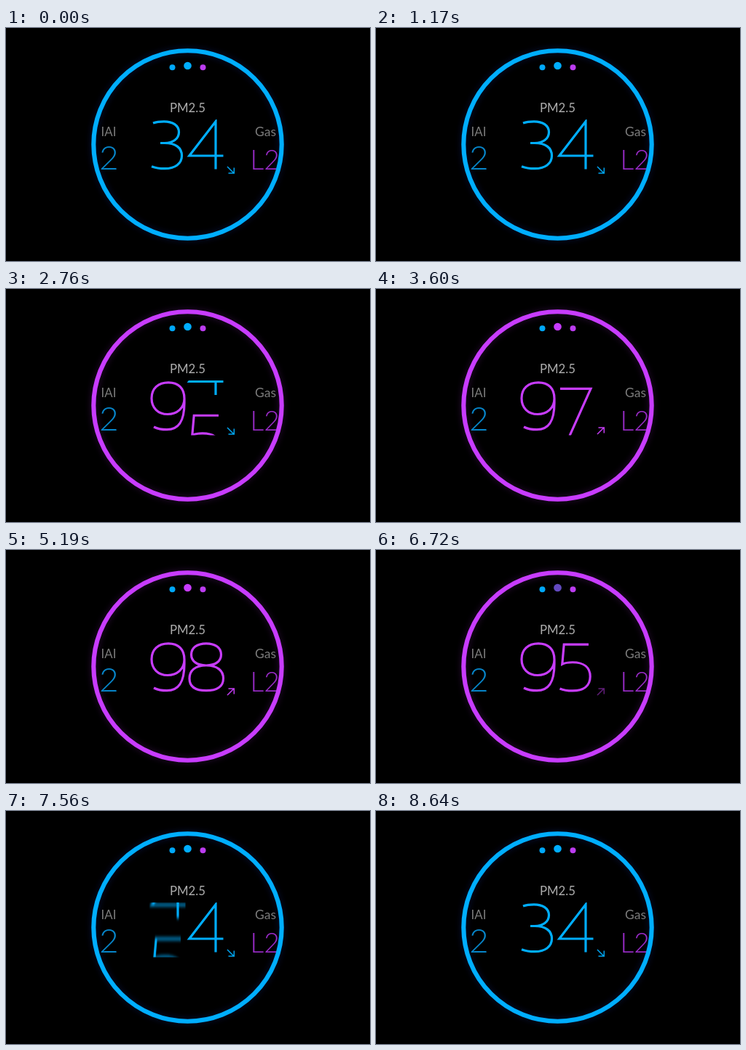
Animation, 500 px wide and 321 px high, one loop 9060 ms. Source, as an HTML page:

```html
<!DOCTYPE html>
<html lang="en">
<head>
<meta charset="utf-8">
<title>Air quality dial</title>
<style>
  html, body { margin: 0; height: 100%; overflow: hidden; background: #000; }
  svg { display: block; width: 100vw; height: 100vh; }
  text { font-family: Lato, "Open Sans", sans-serif; font-weight: 300; }
  .labels text { font-weight: 400; }
  .line { fill: none; stroke-width: 3.2; }
  .arrow { fill: none; stroke-width: 1.5; }
</style>
</head>
<body>
<svg viewBox="0 0 500 321">
  <defs>
    <clipPath id="window"><rect x="190" y="126" width="112" height="75.5"/></clipPath>
    <filter id="soft" x="-20%" y="-20%" width="140%" height="140%">
      <feGaussianBlur stdDeviation="5"/>
    </filter>
    <filter id="smear" filterUnits="userSpaceOnUse" x="-10" y="-120" width="75" height="320">
      <feGaussianBlur id="smearSize" stdDeviation="0 2"/>
    </filter>
  </defs>
  <rect width="500" height="321"/>
  <circle id="glow" cx="249.5" cy="160.5" r="129" fill="none" stroke-width="8" opacity=".17" filter="url(#soft)"/>

  <g class="labels" font-size="16.8" text-anchor="middle" fill="#7c7c7c">
    <text x="249.5" y="115.8" fill="#acacac">PM2.5</text>
    <text x="141" y="149">IAI</text>
    <text x="356.5" y="149" font-size="17.5">Gas</text>
  </g>
  <text x="128" y="194.8" font-size="46" fill="#0785c9">2</text>
  <text x="335.5" y="194.8" font-size="37" fill="#9b2cca">L2</text>

  <g clip-path="url(#window)">
    <g id="tens" class="line" transform="translate(198 127)"></g>
    <g id="units" class="line" transform="translate(250 127)"></g>
  </g>

  <path id="down" class="arrow" stroke="#00a4f0" d="M304 191 L313 200 M305.5 200 H313.3 V192.5"/>
  <path id="up" class="arrow" stroke="#c43cf4" d="M304 200 L313 191 M305.5 191 H313.3 V198.5"/>

  <circle cx="228.5" cy="54.3" r="4" fill="#00a8f8"/>
  <circle id="calmDot" cx="249.5" cy="52" r="5.3" fill="#00aeff"/>
  <circle id="alarmDot" cx="249.5" cy="52" r="5.3" fill="#c83cff"/>
  <circle cx="270.5" cy="54.3" r="4" fill="#bc3cf0"/>
  <circle id="ring" cx="249.5" cy="160.5" r="129.2" fill="none" stroke-width="6.1"/>
</svg>
<script>
const LOOP = 9060, PITCH = 93;
const BLUE = [0, 174, 255], PURPLE = [200, 60, 255], INDIGO = [40, 70, 255];
const $ = id => document.getElementById(id);

// Single-line digit shapes in a 50 x 68 box
const DIGITS = {
  3: "M4 4C8 2.5 13 1.8 19 1.8C31 1.8 39.5 7 39.5 16.5C39.5 26 31 31.5 20 31.5H14M20 31.5C35 31.5 43.5 38 43.5 49C43.5 60 34 66.7 20 66.7C13 66.7 7 65.7 2 63.7",
  4: "M48.5 49H1.8L38 1.8V67.5",
  5: "M42 2.8H8.2L5.8 30C9 28.5 14 27.5 20 27.5C36 27.5 44.2 35 44.2 47C44.2 60 35 66.7 20 66.7C13 66.7 7 65.7 2.5 63.7",
  6: "M42 5C37 3 32 1.8 27 1.8C10 1.8 3 15 3 39V45C3 59 11 66.7 25 66.7S48 59 48 46.5S39 26 26 26S3 33 3 45",
  7: "M3 2.8H45L16 67.5",
  8: "M25 32C12 32 4.5 26 4.5 17S12 1.8 25 1.8S45.5 8 45.5 17S38 32 25 32C10 32 2 39 2 50S10 66.7 25 66.7S48.5 61 48.5 50S40 32 25 32Z",
  9: "M47 24C47 10 39 1.8 25 1.8S2 10 2 23.5S11 45.5 24 45.5S47 37 47 24V30C47 54 40 66.7 23 66.7C16 66.7 10 65.5 5 63"
};

const ramp = (t, a, b) => Math.min(1, Math.max(0, (t - a) / (b - a)));
// 0 -> 1 between a and b, back to 0 between c and d
const trip = (t, a, b, c, d) => ramp(t, a, b) - ramp(t, c, d);
const rgb = c => `rgb(${c.map(Math.round)})`;
const mix = (a, b, k) => rgb(a.map((v, i) => v + (b[i] - v) * k));
const fade = (id, opacity) => $(id).setAttribute("opacity", opacity);

function makeReel(id, first, last, firstPurple) {
  const strip = document.createElementNS("http://www.w3.org/2000/svg", "g");
  for (let n = first; n <= last; n++) {
    strip.innerHTML += `<path d="${DIGITS[n]}" stroke="${rgb(n < firstPurple ? BLUE : PURPLE)}" transform="translate(0 ${(n - first) * PITCH})"/>`;
  }
  $(id).append(strip);
  return value => strip.setAttribute("transform", `translate(0 ${(first - value) * PITCH})`);
}
const rollTens = makeReel("tens", 3, 9, 7);
const rollUnits = makeReel("units", 4, 8, 5);

function draw(t) {
  const tens = trip(t, 1665, 2578, 7070, 7725);
  rollTens(3 + 6 * tens);
  rollUnits(4 + 4 * trip(t, 2578, 3980, 5670, 7070));

  // Vertical motion blur while the tens reel spins
  if (tens > 0 && tens < 1) $("tens").setAttribute("filter", "url(#smear)");
  else $("tens").removeAttribute("filter");
  $("smearSize").setAttribute("stdDeviation", t < 5000 ? "0 1.9" : "0 2.8");

  const alarm = trip(t, 2250, 2650, 6770, 7200);
  $("ring").setAttribute("stroke", mix(BLUE, PURPLE, alarm));
  $("glow").setAttribute("stroke", mix(INDIGO, PURPLE, alarm));

  const trend = trip(t, 2800, 3080, 6590, 6850);
  fade("calmDot", 1 - trend);
  fade("alarmDot", trend);
  fade("up", trend);
  fade("down", Math.max(0, 1 - 2 * trend));
}

const start = performance.now();
function tick() {
  draw((performance.now() - start) % LOOP);
  requestAnimationFrame(tick);
}
tick();
</script>
</body>
</html>
```
